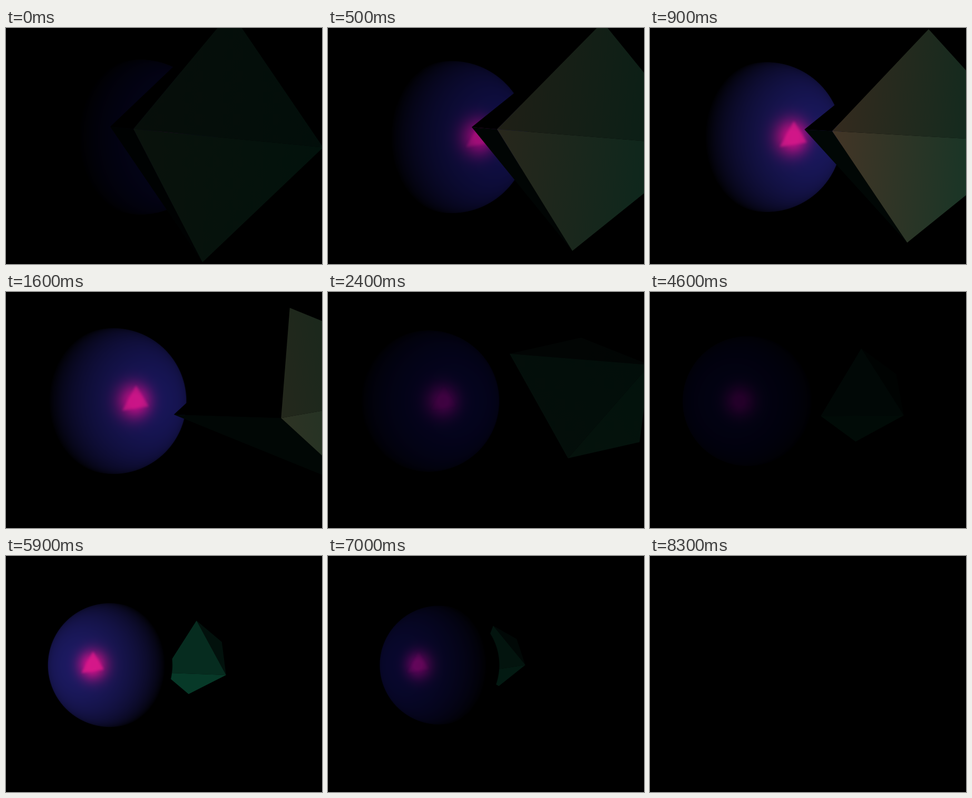
Write an HTML page with a canvas that moves like this. It is 600 px wide and 450 px high and loops after 8400 ms.

```html
<!DOCTYPE html>
<html lang="en">
<head>
<meta charset="utf-8">
<title>Sphere and crystal</title>
<style>
  html, body { margin: 0; width: 100%; height: 100%; overflow: hidden; background: #000; }
  canvas { display: block; }
</style>
</head>
<body>
<canvas id="stage" width="600" height="450"></canvas>
<script>
const LOOP = 8.4, STEP = .1; // seconds
const RAD = Math.PI / 180;
const ctx = document.getElementById('stage').getContext('2d');
const ball = document.createElement('canvas');
const SIZE = ball.width = ball.height = 304;
const ballCtx = ball.getContext('2d');
const image = ballCtx.createImageData(SIZE, SIZE);

const clamp = (v, lo = 0, hi = 1) => Math.min(hi, Math.max(lo, v));
const mix = (a, b, k) => a + (b - a) * k;
const bump = (t, at, width) => Math.exp(-(((t - at) / width) ** 2));
const ease = k => { k = clamp(k); return k * k * (3 - 2 * k); };

// Light pulse, peaking at 1.2 s and 6 s
const level = t => Math.abs(Math.cos(Math.PI * (t - 1.2) / 4.8)) ** 3.4;

function shadeBall(r, angle, light) {
  const d = image.data, mid = SIZE / 2;
  const lx = Math.sin(angle), lz = Math.cos(angle);
  const hx = Math.sin(angle / 2), hz = Math.cos(angle / 2);
  const dim = light ** 1.6;
  for (let y = 0, p = 0; y < SIZE; y++) {
    for (let x = 0; x < SIZE; x++, p += 4) {
      const u = (x + .5 - mid) / r, v = (y + .5 - mid) / r;
      const q = u * u + v * v;
      const n = Math.sqrt(Math.max(0, 1 - q));
      const diffuse = Math.max(0, (u * lx + n * lz + .1) / 1.1) ** .85;
      const half = Math.max(0, u * hx + n * hz);
      const shine = Math.min(1, 1.1 * half ** 36);
      d[p] = dim * 28 * diffuse + light * 178 * shine;
      d[p + 1] = dim * 26 * diffuse * (1 - .3 * shine);
      d[p + 2] = light * (98 * diffuse + mix(140, 42, light) * shine);
      d[p + 3] = 255 * clamp((1 - Math.sqrt(q)) * r + .5);
    }
  }
  ballCtx.putImageData(image, 0, 0);
}

function drawBall(t, light) {
  const s = t - 3.7;
  const cx = 183 + 3.84 * s * s - .365 * s ** 3, cy = 208;
  const r = 148 - 5.7 * t + .11 * t * t;
  const angle = 44 * RAD * Math.cos(Math.PI * t / 7.6);
  shadeBall(r, angle, light);
  ctx.drawImage(ball, cx - SIZE / 2, cy - SIZE / 2);

  // Faceted core of the highlight
  ctx.save();
  ctx.translate(cx + r * Math.sin(angle / 2), cy - 2);
  ctx.scale(r / 140, r / 140);
  ctx.globalAlpha = .85 * light ** 3;
  ctx.filter = 'blur(2px)';
  ctx.fillStyle = 'rgb(216, 26, 138)';
  fill([[2, -28], [26, 12], [-24, 20]]);
  ctx.restore();
}

function fill(points) {
  ctx.beginPath();
  for (const [x, y] of points) ctx.lineTo(x, y);
  ctx.closePath();
  ctx.fill();
}

// Octahedron: centre on the stage and the projected half axes
function crystal(t) {
  const swing = bump(t, 1.6, .4);
  const cx = 543 - 32 * t - 143 * Math.exp(-t / .35) + 115 * swing;
  const cy = 208 - 2.5 * t;
  const size = 240 * Math.exp(-.18 * t);
  const stretch = 1 + 1.2 * ((cx - 300) / 400) ** 2; // wide-angle view
  const yaw = (38 - 20 * swing) * RAD;
  const pitch = 32 * RAD * ease((t - 1.2) / 1.2);
  const roll = (6 - 64 * Math.abs(Math.sin(Math.PI * t / 5.6)) ** 5) * RAD;
  const c = Math.cos(roll), s = Math.sin(roll);
  const project = (x, y) => [size * stretch * (x * c - y * s), size * (x * s + y * c)];
  return {
    cx, cy,
    front: project(-Math.sin(yaw), Math.cos(yaw) * Math.sin(pitch)),
    top: project(0, -Math.cos(pitch)),
    side: project(Math.cos(yaw), Math.sin(yaw) * Math.sin(pitch))
  };
}

function drawCrystal(t, light) {
  const { cx, cy, front, top, side } = crystal(t);
  const warmth = 70 * bump(t, 1, 1);
  for (let i = 0; i < 8; i++) {
    const f = i & 1 ? 1 : -1, v = i & 2 ? 1 : -1, s = i & 4 ? 1 : -1;
    const [a, b, c] = [[front, f], [top, v], [side, s]]
      .map(([[x, y], sign]) => [cx + sign * x, cy + sign * y]);
    const area = (b[0] - a[0]) * (c[1] - a[1]) - (b[1] - a[1]) * (c[0] - a[0]);
    if (area * f * v * s <= 0) continue; // faces away

    const lit = light * Math.max(0, .2 + .4 * s + .22 * f - .1 * v);
    const rgb = red => `rgb(${red * lit}, ${62 * lit}, ${44 * lit})`;
    const shade = ctx.createLinearGradient(...a, ...c);
    shade.addColorStop(0, rgb(s > 0 ? 8 + warmth : 8));
    shade.addColorStop(1, rgb(8));
    ctx.fillStyle = shade;
    fill([a, b, c]);
  }
}

function draw(t) {
  const light = level(t);
  ctx.fillStyle = '#000';
  ctx.fillRect(0, 0, 600, 450);
  // The crystal passes from in front of the sphere to behind it
  const layers = [drawBall, drawCrystal];
  if (t > 3.5) layers.reverse();
  for (const layer of layers) layer(t, light);
}

const start = performance.now();
let last = -1;
function tick() {
  const time = ((performance.now() - start) / 1000) % LOOP;
  const step = Math.floor(time / STEP);
  if (step !== last) draw((last = step) * STEP);
  requestAnimationFrame(tick);
}
tick();
</script>
</body>
</html>
```
